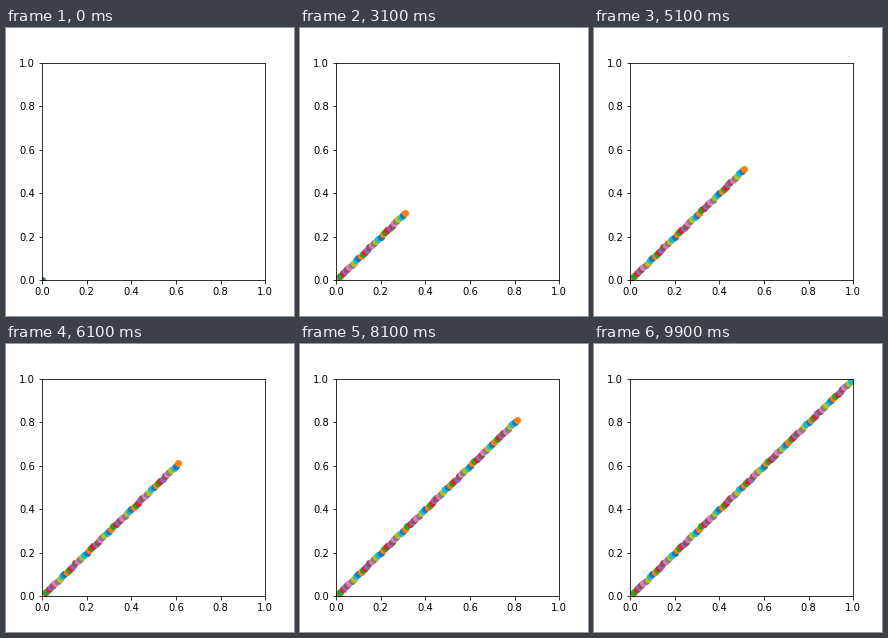
Write a matplotlib script that moves like this. It is 288 by 288 pixels and loops after 10000 ms.

```python
import matplotlib.pyplot as plt
from matplotlib.animation import FuncAnimation

STEPS = 100

plt.rcParams["font.family"] = "DejaVu Sans"
plt.rcParams["font.size"] = 10

fig, ax = plt.subplots(figsize=(4, 4), dpi=72)
fig.subplots_adjust(left=0.125, right=0.9, bottom=0.125, top=0.88)
ax.set(xlim=(0, 1), ylim=(0, 1))

# One dot per step along the diagonal, cycling through the default colours.
dots = [
    ax.plot(i / STEPS, i / STEPS, "o", color=f"C{i % 10}", visible=False)[0]
    for i in range(STEPS)
]


def update(step):
    for i, dot in enumerate(dots):
        dot.set_visible(i <= step)
    return dots


anim = FuncAnimation(fig, update, frames=STEPS, interval=100,
                     init_func=lambda: update(0), repeat=True, repeat_delay=0)
plt.show()
```
